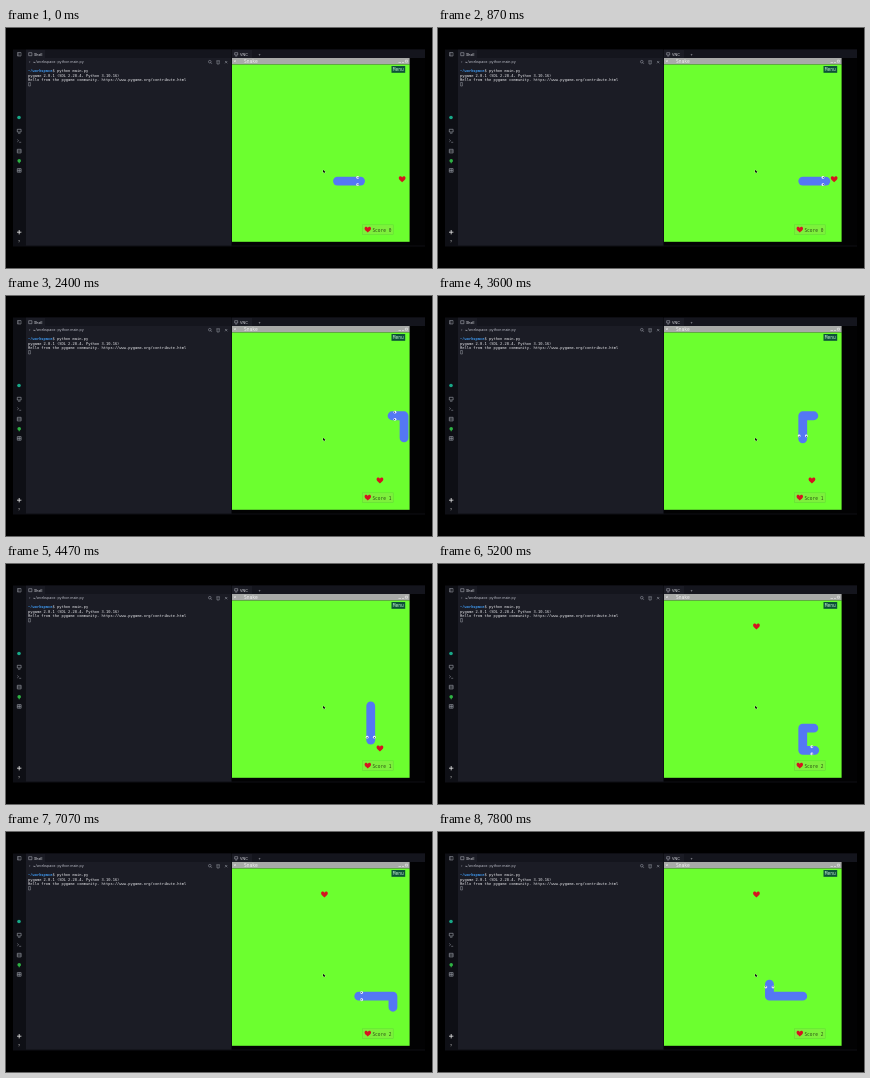
Write an HTML page with a canvas that moves like this. It is 426 by 240 pixels and loops after 8 s.

```html
<!DOCTYPE html>
<html>
<head>
<meta charset="utf-8">
<style>
html, body { margin: 0; width: 100%; height: 100%; overflow: hidden; background: #000; }
canvas { display: block; width: 426px; height: 240px; }
</style>
</head>
<body>
<canvas id="stage"></canvas>
<script>
const canvas = document.getElementById('stage');
const dpr = window.devicePixelRatio || 1;
canvas.width = 426 * dpr;
canvas.height = 240 * dpr;
const ctx = canvas.getContext('2d');
ctx.scale(dpr, dpr);

const MONO = '"DejaVu Sans Mono", monospace', SANS = 'Inter, sans-serif';
const LOOP = 8000, STEP = 300, FIRST = 270;
const CELL = 11.1, LEFT = 226, TOP = 36.5;
const DIRS = { R: [1, 0], L: [-1, 0], U: [0, -1], D: [0, 1] };
const START = 2, MOVES = 'RR' + 'RRRRUUULLLDDDDDDRRUULLLLLU';
const MEALS = [4, 17];
const FOOD = [[15, 10], [13, 13], [8, 2]];

const trail = [[9, 10]];
for (const m of MOVES) {
  const [x, y] = trail[trail.length - 1];
  trail.push([x + DIRS[m][0], y + DIRS[m][1]]);
}

const mid = ([c, r]) => [LEFT + (c + .5) * CELL, TOP + (r + .5) * CELL];

function rect(x, y, w, h, color) {
  ctx.fillStyle = color;
  ctx.fillRect(x, y, w, h);
}

function dot(x, y, r, color) {
  ctx.fillStyle = color;
  ctx.beginPath();
  ctx.arc(x, y, r, 0, 7);
  ctx.fill();
}

// Large font scaled down keeps fractional glyph advances.
function text(str, x, y, size, color, font = SANS, weight = 400) {
  ctx.save();
  ctx.translate(x, y);
  ctx.scale(size / 50, size / 50);
  ctx.font = `${weight} 50px ${font}`;
  ctx.fillStyle = color;
  ctx.fillText(str, 0, 0);
  ctx.restore();
}

function stroke(d, color, width = .6) {
  ctx.strokeStyle = color;
  ctx.lineWidth = width;
  ctx.stroke(new Path2D(d));
}

function heart(x, y, s) {
  ctx.save();
  ctx.translate(x, y);
  ctx.scale(s, s);
  ctx.fillStyle = '#d51420';
  ctx.fill(new Path2D('M0 3.1C-1.3 1.9-3.4.6-3.4-1.1C-3.4-3.2-.8-3.5 0-1.7C.8-3.5 3.4-3.2 3.4-1.1C3.4.6 1.3 1.9 0 3.1Z'));
  ctx.restore();
}

function sidebar() {
  const grey = '#a0a4ae';
  stroke('M11.5 24.5h3.5v3.5h-3.5zM12.8 24.5v3.5', grey, .5);
  dot(13, 89.5, 1.8, '#18a888');
  stroke('M11.3 101.3h3.8v2.7h-3.8zM12 105.2h2.4', grey);
  stroke('M11.3 111.5l1.3 1.2l-1.3 1.2M13.2 114.3h2', grey, .5);
  stroke('M11.3 121.3h3.8v3.6h-3.8zM11.3 123h3.8', grey);
  dot(13.2, 132.7, 1.8, '#2fb344');
  rect(12.7, 134, 1, 1.3, '#2fb344');
  stroke('M11.3 140.6h3.8v3.6h-3.8zM13.2 140.6v3.6M11.3 142.4h3.8', grey);
  stroke('M13.2 202v4.4M11 204.2h4.4', '#eee', .8);
  text('?', 12.1, 214.6, 4, '#bbb');
}

function shell() {
  rect(20, 30, 205, 187.5, '#1b1c25');
  rect(20, 21.5, 205, 8.5, '#14151d');
  rect(20, 22, 19, 8, '#1b1c25');
  stroke('M22.7 24.7h3.2v3h-3.2z', '#b8bac4', .5);
  text('Shell', 28, 27.6, 3.6, '#dfe0e6');
  text('›', 23, 35.2, 4, '#9699a5');
  text('~/workspace: python main.py', 27, 35.3, 3.6, '#b6b8c2');
  ctx.beginPath();
  ctx.arc(203.8, 33.7, 1.3, 0, 7);
  ctx.strokeStyle = '#a5a8b2';
  ctx.lineWidth = .5;
  ctx.stroke();
  stroke('M204.7 34.6l1.2 1.2M210.4 32.8h3.4M211 32.8v3.2h2.2v-3.2M219 33l2.3 2.3M221.3 33l-2.3 2.3', '#a5a8b2', .5);

  const term = (s, x, y, color = '#e8e8ec', weight) => text(s, x, y, 3.7, color, MONO, weight);
  term('~/workspace', 22, 43.9, '#3f9cf5', 700);
  term('$ python main.py', 46.5, 43.9);
  term('pygame 2.0.1 (SDL 2.28.4, Python 3.10.16)', 22, 48.5);
  term('Hello from the pygame community. https://www.pygame.org/contribute.html', 22, 53);
  stroke('M22.6 54.5h1.8v3.5h-1.8z', '#b8bac4', .4);
}

function gameWindow() {
  rect(226, 21.5, 193, 8.5, '#14151d');
  rect(226, 22, 20, 8, '#1b1c25');
  rect(226, 30, 193, 187.5, '#020203');
  stroke('M228.7 24.7h3v2.3h-3zM229.2 28h2', '#b8bac4', .5);
  text('VNC', 234, 27.6, 3.6, '#dfe0e6');
  text('+', 252.2, 27.7, 4, '#c0c2ca');

  rect(226, 30, 177.6, 6.5, '#a8aaa8');
  stroke('M228 32.2l1.8 2M229.8 32.2l-1.8 2M392.5 34.5h2.5M396 34.5h2M399.4 32.2h2v2h-2z', '#ececec', .6);
  text('Snake', 238, 35, 4.6, '#f2f2f2', MONO);
  rect(226, 36.5, 177.6, 177.3, '#6cff2f');

  rect(385.5, 38, 13.7, 6.8, '#0d5238');
  text('Menu', 386.7, 43, 4.6, '#c3f3cf', MONO);
}

function snake(step) {
  const head = step + START;
  const length = 3 + MEALS.filter(m => step > m).length;
  const body = trail.slice(head - length + 1, head + 1).reverse();
  // A freshly grown segment sits beside the tail until the next move.
  if (MEALS.includes(step)) {
    const [c, r] = body[body.length - 1];
    body.push([c + 1, r]);
  }
  const [hx, hy] = mid(body[0]);
  const [dx, dy] = DIRS[MOVES[head - 1]];
  ctx.beginPath();
  ctx.moveTo(hx + dx * .9, hy + dy * .9);
  body.forEach(cell => ctx.lineTo(...mid(cell)));
  ctx.lineWidth = 8.8;
  ctx.lineCap = ctx.lineJoin = 'round';
  ctx.strokeStyle = '#5477f4';
  ctx.stroke();
  ctx.lineCap = 'butt';
  ctx.lineJoin = 'miter';

  ctx.save();
  ctx.translate(hx, hy);
  ctx.rotate(Math.atan2(dy, dx));
  for (const side of [-3.6, 3.6]) {
    dot(-2, side, 1.4, '#eef3ff');
    dot(-1.6, side, .55, '#26345f');
  }
  ctx.restore();
}

function score(n) {
  rect(356.5, 196.8, 30.7, 9.9, '#7df03c');
  ctx.strokeStyle = '#5fd935';
  ctx.lineWidth = .5;
  ctx.strokeRect(356.5, 196.8, 30.7, 9.9);
  heart(361.8, 201.6, .95);
  text('Score ' + n, 366.4, 203.7, 4.5, '#2f5416', MONO);
}

function pointer() {
  const arrow = new Path2D('M317 141.8v3l.8-.7l.6 1.2l.6-.3l-.5-1.1h1z');
  ctx.strokeStyle = '#d8f5c8';
  ctx.lineWidth = .4;
  ctx.stroke(arrow);
  ctx.fillStyle = '#111';
  ctx.fill(arrow);
}

function draw(now) {
  const t = now % LOOP;
  const step = Math.floor((t - FIRST) / STEP) + 1;
  const points = MEALS.filter(m => step >= m).length;
  rect(0, 0, 426, 240, '#000');
  rect(7, 21.5, 412, 197, '#0e0f15');
  sidebar();
  shell();
  gameWindow();
  const [fx, fy] = mid(FOOD[points]);
  heart(fx - 1.9, fy - 1.9, 1);
  snake(step);
  score(points);
  pointer();
}

const begin = performance.now();
function tick() {
  draw(performance.now() - begin);
  requestAnimationFrame(tick);
}
tick();
</script>
</body>
</html>
```
